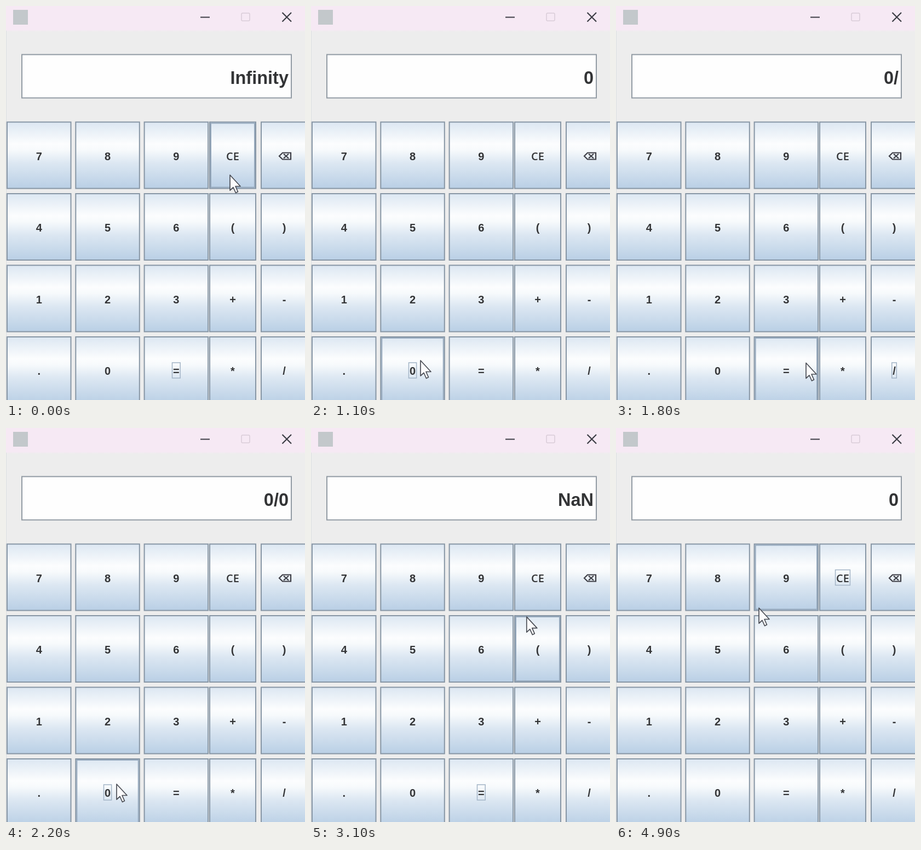
Recreate the animation shown at these times as an HTML page. Size 546 by 718 pixels, loop 5 s.

```html
<!DOCTYPE html>
<html lang="en">
<head>
<meta charset="utf-8">
<title>Calculator</title>
<style>
  html, body { margin: 0; width: 100%; height: 100%; overflow: hidden; background: #ededed; }
  svg { display: block; width: 546px; height: 718px; }
  text { font-family: "Liberation Sans", Arial, sans-serif; font-weight: bold; fill: #333436; }
  .soft { filter: blur(.55px); }
  .label { font-size: 20px; text-anchor: middle; }
  .word { font-family: "Open Sans", "Noto Sans", sans-serif; font-weight: 600; }
  .key { fill: url(#ocean); stroke: #8796a5; stroke-width: 2; }
  .line { fill: none; stroke: #3c3d45; stroke-width: 2.2; }
</style>
</head>
<body>
<svg viewBox="0 0 546 718">
  <defs>
    <linearGradient id="ocean" x2="0" y2="1">
      <stop offset="0" stop-color="#dce7f2"/>
      <stop offset=".33" stop-color="#fcfdfe"/>
      <stop offset=".42" stop-color="#f7fafc"/>
      <stop offset=".62" stop-color="#dce7f2"/>
      <stop offset="1" stop-color="#b9cfe5"/>
    </linearGradient>
    <linearGradient id="bar" x2="0" y2="1">
      <stop offset=".92" stop-color="#f6e9f4"/>
      <stop offset="1" stop-color="#ededed"/>
    </linearGradient>
  </defs>
  <rect width="546" height="718" fill="#ededed"/>
  <rect width="546" height="47" fill="url(#bar)"/>
  <path d="M.5 45V718" stroke="#dcdfe2"/>
  <g class="soft">
    <rect x="13" y="7" width="27" height="27" fill="#c3c8cb"/>
    <path class="line" d="M355 20.5H372M504.500 12L521 28.500M521 12L504.500 28.500"/>
    <rect x="430" y="13" width="15" height="14" rx="2" fill="none" stroke="#d9ccd7" stroke-width="1.500"/>
    <rect x="29" y="88.500" width="492" height="79" fill="#fefefe" stroke="#929ba4" stroke-width="2"/>
    <text id="display" x="516" y="142" font-size="32.500" text-anchor="end"></text>
    <g id="keys"></g>
    <rect id="hover" fill="none" stroke="#96a9bd" stroke-width="2"/>
    <rect id="focus" fill="none" stroke="#a3b4c6" stroke-width="1.500" height="28"/>
    <path id="cursor" d="M0 1V29L6 23.500L10.500 33.500L14.500 31.500L10 21.500H19Z"
          fill="#fcfcfd" stroke="#4a4d55" stroke-width="1.700" stroke-linejoin="round"/>
  </g>
</svg>
<script>
const LOOP = 5000, STEP = 100;
const rows = ["789C⌫", "456()", "123+-", ".0=*/"];

// The pointer rests at each stop from `arrive` to `leave`; a stop with a key clicks it at `click`.
const stops = [
  { arrive: 0, leave: 200, x: 409, y: 307, key: "C", click: 300 },
  { arrive: 500, leave: 500, x: 271, y: 462 },
  { arrive: 1000, leave: 1100, x: 200, y: 645, key: "0", click: 1000 },
  { arrive: 1500, leave: 1600, x: 492, y: 651, key: "/", click: 1500 },
  { arrive: 2000, leave: 2200, x: 202, y: 648, key: "0", click: 2100 },
  { arrive: 2400, leave: 2600, x: 308, y: 647, key: "=", click: 2500 },
  { arrive: 3300, leave: 4700, x: 415, y: 268, key: "C", click: 4200 },
  { arrive: 4900, leave: LOOP, x: 261, y: 327 }
];

const $ = id => document.getElementById(id);
function set(node, attrs) {
  for (const name in attrs) node.setAttribute(name, attrs[name]);
}
function add(name, attrs, text = "") {
  const node = document.createElementNS("http://www.w3.org/2000/svg", name);
  set(node, attrs);
  node.textContent = text;
  return $("keys").appendChild(node);
}

function makeKey(name, r, c) {
  const digit = c < 3;
  const key = {
    name,
    x: digit ? 2 + 125.3 * c : 372 + 94 * (c - 3),
    y: 211.5 + 130.5 * r,
    width: digit ? 116.5 : 84,
    height: 121
  };
  key.middle = key.x + key.width / 2;
  const { x, y, width, height, middle } = key;
  add("rect", { class: "key", x, y, width, height });
  if (name === "⌫") {
    add("path", { class: "line", d: "M499 273.500l6-6h15v12h-15zM507 269.500l9 8m0-8l-9 8" });
  } else {
    const word = name === "C";
    key.label = add("text", { class: word ? "label word" : "label", x: middle, y: y + 69 }, word ? "CE" : name);
  }
  return key;
}
const keys = rows.flatMap((row, r) => [...row].map((name, c) => makeKey(name, r, c)));

function press(text, key) {
  if (key === "C") return "0";
  if (key === "=") {
    const [a, b] = text.split("/");
    return String(a / b);
  }
  return text === "0" && key !== "/" ? key : text + key;
}

function calculator(t) {
  return stops.filter(s => s.key && s.click <= t).reduce(
    ({ text }, { key }) => ({ text: press(text, key), focused: key }),
    { text: "Infinity", focused: "=" });
}

function pointer(t) {
  const i = stops.findLastIndex(s => s.arrive <= t);
  const from = stops[i], to = stops[i + 1];
  if (t <= from.leave) return from;
  const k = (t - from.leave) / (to.arrive - from.leave);
  const eased = k * k * (3 - 2 * k);
  return { x: from.x + (to.x - from.x) * eased, y: from.y + (to.y - from.y) * eased };
}

const contains = (k, p) => p.x >= k.x && p.x <= k.x + k.width && p.y >= k.y && p.y <= k.y + k.height;

function draw(elapsed) {
  const t = Math.floor(elapsed % LOOP / STEP) * STEP;
  const tip = pointer(t);
  const { text, focused } = calculator(t);
  $("display").textContent = text;
  set($("cursor"), { transform: `translate(${tip.x} ${tip.y})` });

  const over = keys.find(k => contains(k, tip));
  $("hover").style.display = over ? "" : "none";
  if (over) set($("hover"), { x: over.x + 2, y: over.y + 2, width: over.width - 4, height: over.height - 4 });

  const key = keys.find(k => k.name === focused);
  const width = key.label.getComputedTextLength() + 3;
  set($("focus"), { x: key.middle - width / 2, y: key.y + 47, width });
}

let start;
function loop(now) {
  start ??= now;
  draw(now - start);
  requestAnimationFrame(loop);
}
draw(0);
requestAnimationFrame(loop);
</script>
</body>
</html>
```
